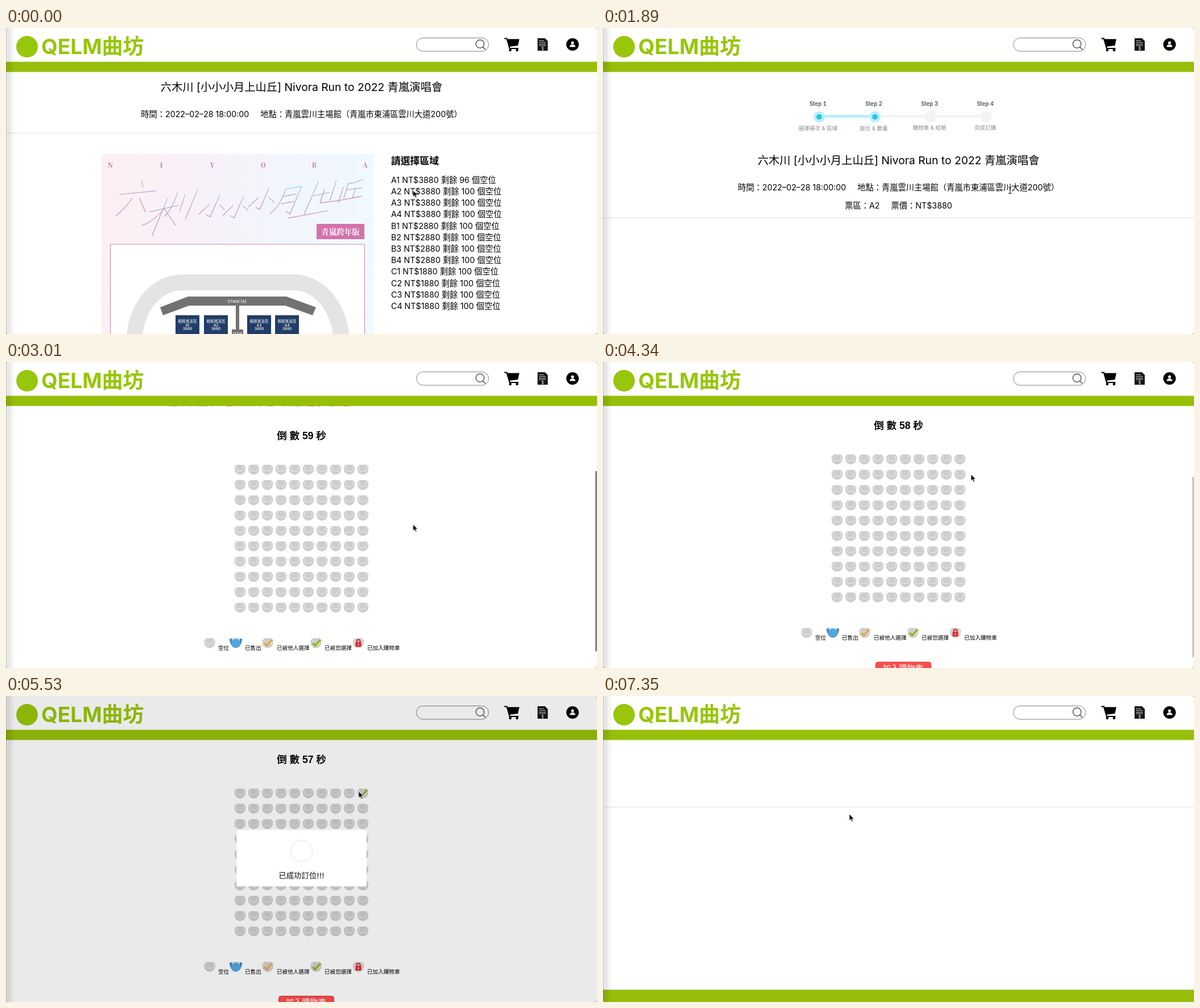
Animation, 1039 px wide and 539 px high, one loop 8 s. Source, as an HTML page:

```html
<!DOCTYPE html>
<html lang="zh-Hant">
<head>
<meta charset="utf-8">
<title>Ticket booking</title>
<style>
html, body { margin: 0; width: 100%; height: 100%; overflow: hidden; background: #8a8a8a; }
svg { display: block; width: 1039px; height: 539px; background: #fff; border-radius: 4px; }
text { font: 14.25px Inter, "Noto Sans CJK TC", sans-serif; white-space: pre; }
.mid { text-anchor: middle; }
.title { font-size: 19.3px; }
.bold { font-weight: 700; }
.serif { font-family: "Noto Serif CJK TC", "Noto Serif", serif; font-weight: 700; }
.count { font: 700 17.5px "Liberation Sans", "Noto Sans CJK TC", sans-serif; }
.step { font: 700 10.5px Lato, sans-serif; fill: #555; }
.hint { font-size: 9.5px; fill: #8a8a8a; }
.note { font-size: 12px; fill: #c5291c; }
.legend { font-size: 9.6px; font-weight: 500; }
.block { font-size: 6.6px; fill: #fff; font-weight: 500; }
.rule { stroke: #dedede; }
.line { fill: none; }
</style>
</head>
<body>
<svg viewBox="0 0 1039 539">
  <defs>
    <linearGradient id="sky">
      <stop stop-color="#fdeff3"/><stop offset=".4" stop-color="#f7f2f9"/>
      <stop offset=".7" stop-color="#f1f6fc"/><stop offset="1" stop-color="#f0f9fe"/>
    </linearGradient>
    <linearGradient id="ink" x2="0" y2="1">
      <stop stop-color="#8ccbe6"/><stop offset=".4" stop-color="#b99cc6"/><stop offset="1" stop-color="#c67fab"/>
    </linearGradient>
    <g id="seat">
      <path d="M-9.500-6H-7V-8.500H7V-6H9.500V0A9.500 9 0 0 1-9.500 0Z" fill="#cecece"/>
      <path class="line" d="M-6.500-6V0Q-6.500 2.500-4 2.500H4Q6.500 2.500 6.500 0V-6" stroke="#ebebeb"/>
    </g>
    <path id="tick" class="line" d="M-6 0L-1.5 4.5L8-6" stroke-width="3"/>
  </defs>

  <g id="home">
    <text class="mid title" x="519.5" y="111">六木川 [小小小月上山丘] Nivora Run to 2022 青嵐演唱會</text>
    <text class="mid" x="519.5" y="157">時間：2022–02–28 18:00:00     地點：青嵐雲川主場館（青嵐市東浦區雲川大道200號）</text>
    <path class="rule" d="M0 185H1039"/>
    <rect x="168" y="222" width="478" height="317" fill="url(#sky)"/>
    <g id="letters" fill="#c66ba4"></g>
    <g id="script" class="line" stroke="url(#ink)" stroke-width="1.1"></g>
    <rect x="546" y="345" width="84" height="27" fill="#d472ab"/>
    <text class="mid serif" x="588" y="363.5" fill="#fff" style="font-size:13.5px">青嵐跨年版</text>
    <path d="M183.5 545V381H630.5V545" fill="#fff" stroke="#cb86a6"/>
    <rect class="line" x="225.5" y="448" width="364" height="230" rx="84" ry="105" stroke="#e4e4e3" stroke-width="28"/>
    <path d="M271 492L320 473H493L545 492L539 506L491 489H322L276 506ZM404 488h6v43h7v10h-20v-10h7z" fill="#727272"/>
    <text class="mid block" x="406" y="483.5">STAGE [A]</text>
    <text class="mid block" x="407" y="540" style="font-size:5px">STAGE</text>
    <g id="blocks"></g>
    <text class="bold" x="677" y="239.5" style="font-size:16.8px">請選擇區域</text>
    <g id="areas"></g>
  </g>

  <g id="blank">
    <path class="rule" d="M0 195.5H1039"/>
    <path d="M0 517H1039V539H0Z" fill="#97bf0a"/>
    <path d="M0 517.5H1039" stroke="#b9c48a"/>
  </g>

  <g id="order">
    <g id="scroll">
      <path d="M478 155.5H674" stroke="#f3f3f3" stroke-width="5"/>
      <g id="steps"></g>
      <path d="M388 155.5H470" stroke="#b9effb" stroke-width="5"/>
      <text class="mid title" x="519.5" y="240">六木川 [小小小月上山丘] Nivora Run to 2022 青嵐演唱會</text>
      <text class="mid" x="519.5" y="286">時間：2022–02–28 18:00:00     地點：青嵐雲川主場館（青嵐市東浦區雲川大道200號）</text>
      <text class="mid" x="519.5" y="318">票區：A2     票價：NT$3880</text>
      <path class="rule" d="M0 334.5H1039"/>
      <g id="notes">
        <text class="note" x="265" y="372">1. 請於倒數時間內選擇座位，並加入購物車完成結帳</text>
        <text class="note" x="265" y="396">2. 灰色為空位，已售出及已被他人選擇的座位無法點選</text>
        <text class="note" x="265" y="420">3. 勿重新刷新此頁面！重新刷新頁面者，系統會清空您所選的座位</text>
        <g id="clock"></g>
      </g>
      <g id="hall">
        <g id="seats"></g>
        <g id="mine" transform="translate(627 532)"><use href="#tick" stroke="#8ab50c"/></g>
        <g id="legend"></g>
        <rect x="479.5" y="889.5" width="97" height="25" rx="4" fill="#ff4d4d" stroke="#cf3b3b"/>
        <text class="mid" x="527.5" y="906" fill="#fff">加入購物車</text>
      </g>
    </g>
  </g>

  <g id="header">
    <path d="M0 0H1039V60H0Z" fill="#fff"/>
    <path d="M0 59.5H1039V77.5H0Z" fill="#97bf0a"/>
    <circle cx="37" cy="33" r="19" fill="#97c60a"/>
    <text class="bold" x="62" y="46" fill="#97c60a" style="font-size:37px">QELM曲坊</text>
    <rect class="line" x="721.5" y="17.5" width="127" height="23.5" rx="11.7" stroke="#828282"/>
    <path class="line" d="M838.5 33.5L843 38M840.5 28a7.2 7.2 0 1 0-14.4 0a7.2 7.2 0 1 0 14.400 0" stroke="#333" stroke-width="1.2"/>
    <path class="line" d="M876 18.5H880.5L885.5 36H901" stroke="#000" stroke-width="2.2"/>
    <path d="M881 19.5H902.5L900 31L884.5 33Z"/>
    <circle cx="886.5" cy="39" r="2.3"/><circle cx="898.5" cy="39" r="2.3"/>
    <path d="M934.5 18H947.5L952.5 23V40H934.5Z" fill="#151515"/>
    <path d="M937 22.5H946M937 25.5H949M937 28.5H949M937 31H949" stroke="#ddd" stroke-width=".9"/>
    <text class="mid" x="943.5" y="38.5" fill="#fff" style="font-size:7px">$</text>
    <circle cx="996" cy="29" r="11"/>
    <circle cx="996" cy="26" r="2.600" fill="#fff"/>
    <path d="M991 33.500q0-4.500 5-4.500t5 4.500z" fill="#fff"/>
  </g>

  <g id="bar"><rect id="thumb" x="1036" y="2" width="4" height="318" rx="2"/></g>
  <path d="M0 0H14V539H0Z" opacity=".04"/><path d="M0 0H8V539H0Z" opacity=".06"/><path d="M0 0H1V539H0Z" opacity=".15"/>
  <rect id="veil" width="1039" height="539"/>

  <g transform="translate(519.5 285.5)">
    <g id="dialog">
      <rect x="-153.5" y="-66.5" width="307" height="133" rx="3" fill="#fff"/>
      <circle class="line" cy="-17" r="25.5" stroke="#efefdb" stroke-width="2"/>
      <path id="done" class="line" d="M-14.5-16.5L-5.5-7.5L15.5-26.5" stroke="#bfd27c" stroke-width="3" stroke-dasharray="43 60"/>
      <text class="mid bold" y="48.5" fill="#595959" style="font-size:18px">已成功訂位!!!</text>
    </g>
  </g>

  <g id="cursor" stroke="#fff" stroke-width=".8">
    <path id="arrow" d="M0 0V11.5L2.7 9L4.6 13.3L6.6 12.4L4.7 8.3H8.3Z"/>
    <path id="hand" d="M-1 0Q1-1.5 1.5 .5V5L7 6Q8.5 6.5 8.3 8.5L7 13.5H0L-3.5 9Q-4 6-1 8.5Z" fill="#fff" stroke="#000"/>
    <path id="beam" class="line" d="M-3-5.5Q0-5.5 0-4V4Q0 5.5-3 5.5M3-5.5Q0-5.5 0-4M0 4Q0 5.5 3 5.5" stroke="#222" stroke-width="1.1"/>
  </g>
</svg>
<script>
const LOOP = 8000;
const range = n => [...Array(n).keys()];
const fill = (id, html) => { document.getElementById(id).innerHTML = html; };
const text = (cls, x, y, s, extra = '') => `<text class="${cls}" x="${x}" y="${y}" ${extra}>${s}</text>`;
const seat = (x, y, extra = '') => `<g transform="translate(${x} ${y})"><use href="#seat"/>${extra}</g>`;

// Poster
fill('letters', [...'NIVORA'].map((c, i) => text('mid serif', 183.5 + 89.6 * i, 245.5, c, 'style="font-size:11px"')).join(''));
const glyphs = {
  六: 'M5 0L6 2M0 4L10 3M4 5Q3 8 1 10M6 5L9 9',
  木: 'M1 4L9 2M5 0L4 11M5 3Q3 7 0 8M5 3L10 8',
  川: 'M2 1Q2 7 0 10M5 2L5 8M9 0L8 11',
  小: 'M6 0L5 9L3 8M3 4L0 8M7 4L10 6',
  月: 'M3 1Q3 8 0 11M3 1L9 0L8 11L6 10M3 4L8 3M3 7L8 6',
  上: 'M5 0L4 9M5 4L9 3M0 10L10 8',
  山: 'M5 0L5 9M1 4L1 10L9 9M9 3L9 10',
  丘: 'M8 0Q5 2 2 2L2 9M2 5L9 4M6 4L6 9M0 10L10 8'
};
const brush = [
  ['六', 202, 268, 6.3], ['木', 249, 300, 6], ['川', 289, 284, 4.8],
  ['小', 345, 294, 4.3], ['小', 387, 296, 4.3], ['小', 432, 281, 4.3],
  ['月', 475, 279, 4.4], ['上', 512, 270, 6.5], ['山', 556, 268, 4], ['丘', 592, 266, 3.8]
];
fill('script', brush.map(([c, x, y, s]) =>
  `<path d="${glyphs[c]}" vector-effect="non-scaling-stroke" transform="translate(${x + 5} ${y}) skewX(-18) scale(${s})"/>`).join(''));
fill('blocks', [298, 348, 424, 473].map((x, i) =>
  `<rect x="${x}" y="506" width="42" height="40" fill="#213d68"/>` +
  ['輕輕搖滾區', 'A' + (i + 1), '3880'].map((s, j) => text('mid block', x + 21, 519 + 6.7 * j, s)).join('')).join(''));

// Area list
fill('areas', range(12).map(i => {
  const row = i >> 2, left = i ? 100 : 96;
  return text('', 677, 272.7 + 20.2 * i, `${'ABC'[row]}${i % 4 + 1} NT$${3880 - 1000 * row} 剩餘 ${left} 個空位`);
}).join(''));

// Progress steps
fill('steps', ['選擇場次 &amp; 區域', '座位 &amp; 數量', '購物車 &amp; 結帳', '完成訂購'].map((s, i) => {
  const x = 380 + 98 * i, on = i < 2;
  return text('mid step', x - 2, 136.5, 'Step ' + (i + 1)) + text('mid hint', x - 2, on ? 180 : 179, s) +
    `<circle cx="${x}" cy="156.5" r="10" fill="${on ? '#b9effb' : '#f3f3f3'}"/>` +
    (on ? `<circle cx="${x}" cy="156.5" r="4.8" fill="#27c5e8"/>` : '');
}).join(''));

// Seats and legend
fill('seats', range(100).map(i => seat(411.5 + 24 * (i % 10), 532.5 + 27 * Math.floor(i / 10))).join(''));
const sold = '<path d="M-11.5-6.5L-7-8.5L-5-3V6Q-10 2-11.500-6.5ZM11.5-6.5L7-8.500L5-3V6Q10 2 11.5-6.5Z" fill="#3f86c4"/>' +
  '<rect x="-7" y="-8.5" width="14" height="8" fill="#dcdcdc"/><circle r="8" cy=".5" fill="#52a6e0"/>';
const lock = '<path class="line" d="M-3 0V-3Q-3-6 0-6T3-3V0" stroke="#e0252c" stroke-width="2"/>' +
  '<rect x="-5" y="-1.5" width="10" height="8" rx="1" fill="#e0252c"/><path d="M0 1V4" stroke="#fff" stroke-width="1.5"/>';
fill('legend', [
  [358, 373, '空位', ''],
  [404, 420, '已售出', sold],
  [460, 476, '已被他人選擇', '<use href="#tick" stroke="#f0a030"/>'],
  [545, 560, '已被您選擇', '<use href="#tick" stroke="#8ab50c"/>'],
  [619.5, 635, '已加入購物車', lock]
].map(([x, tx, s, mark]) => seat(x, 838, mark) + text('legend', tx, 850, s)).join(''));

// Timeline, all times in ms
let css = '';
function track(id, timing, stops) {
  const keys = stops.map(([t, s]) => `${t / LOOP * 100}%{${s}}`).join('');
  css += `@keyframes ${id}{${keys}}#${id}{animation:${id} ${LOOP}ms ${timing} infinite}\n`;
}
// Shows an element between alternating on/off times
const flash = (id, ...edges) =>
  track(id, 'step-end', [[0, 'opacity:0'], ...edges.map((t, i) => [t, `opacity:${(i + 1) % 2}`])]);
const path = (id, timing, points) =>
  track(id, timing, points.map(([t, x, y]) => [t, `transform:translate(${x}px,${y}px)`]));

flash('home', 0, 1184);
flash('blank', 1184, 1880, 7130);
flash('order', 1880, 7130);
flash('notes', 1955, 7130);
flash('hall', 2165, 7130);
flash('mine', 5390, 7130);

const ticks = [1955, 3000, 4030, 5100, 6100, 7130];
fill('clock', range(5).map(i => text('mid count', 519.5, 479, `倒 數 ${60 - i} 秒`, `id="n${60 - i}"`)).join(''));
range(5).forEach(i => flash('n' + (60 - i), ticks[i], ticks[i + 1]));

const scroll = [[0, 0], [2440, 0], [2940, 343], [3280, 343], [3710, 361], [LOOP, 361]];
path('scroll', 'ease-out', scroll.map(([t, y]) => [t, 0, -y]));
path('bar', 'ease-out', scroll.map(([t, y]) => [t, 0, y * .554]));
track('thumb', 'linear', [[0, 'opacity:0'], [2440, 'opacity:0'], [2450, 'opacity:.5'], [4270, 'opacity:.5'], [4410, 'opacity:0'], [LOOP, 'opacity:0']]);

track('veil', 'linear', [[0, 'opacity:0'], [5510, 'opacity:0'], [5610, 'opacity:.4'], [6580, 'opacity:.4'], [6690, 'opacity:0'], [LOOP, 'opacity:0']]);
const pop = (t, s, o = 1) => [t, `transform:scale(${s});opacity:${o}`];
track('dialog', 'ease', [pop(0, .7, 0), pop(5514, .7, 0), pop(5515, .7), pop(5650, 1.05), pop(5755, .95), pop(5815, 1), pop(6580, 1), pop(6730, .5, 0), pop(LOOP, .5, 0)]);
track('done', 'ease', [[0, 'stroke-dashoffset:46'], [5900, 'stroke-dashoffset:46'], [6250, 'stroke-dashoffset:0'], [LOOP, 'stroke-dashoffset:0']]);

path('cursor', 'linear', [[0, 715.5, 286], [3980, 715.5, 286], [4340, 647, 198], [4760, 617, 171], [4970, 616, 169], [5320, 616, 169], [5530, 620, 168], [5650, 618, 168], [6510, 468, 179], [6720, 433, 208], [LOOP, 433, 208]]);
flash('arrow', 0, 695, 1255, 1880, 2520, 4880, 5500);
flash('hand', 695, 1255, 4880, 5500);
flash('beam', 1880, 2520);

document.head.appendChild(document.createElement('style')).textContent = css;
</script>
</body>
</html>
```
